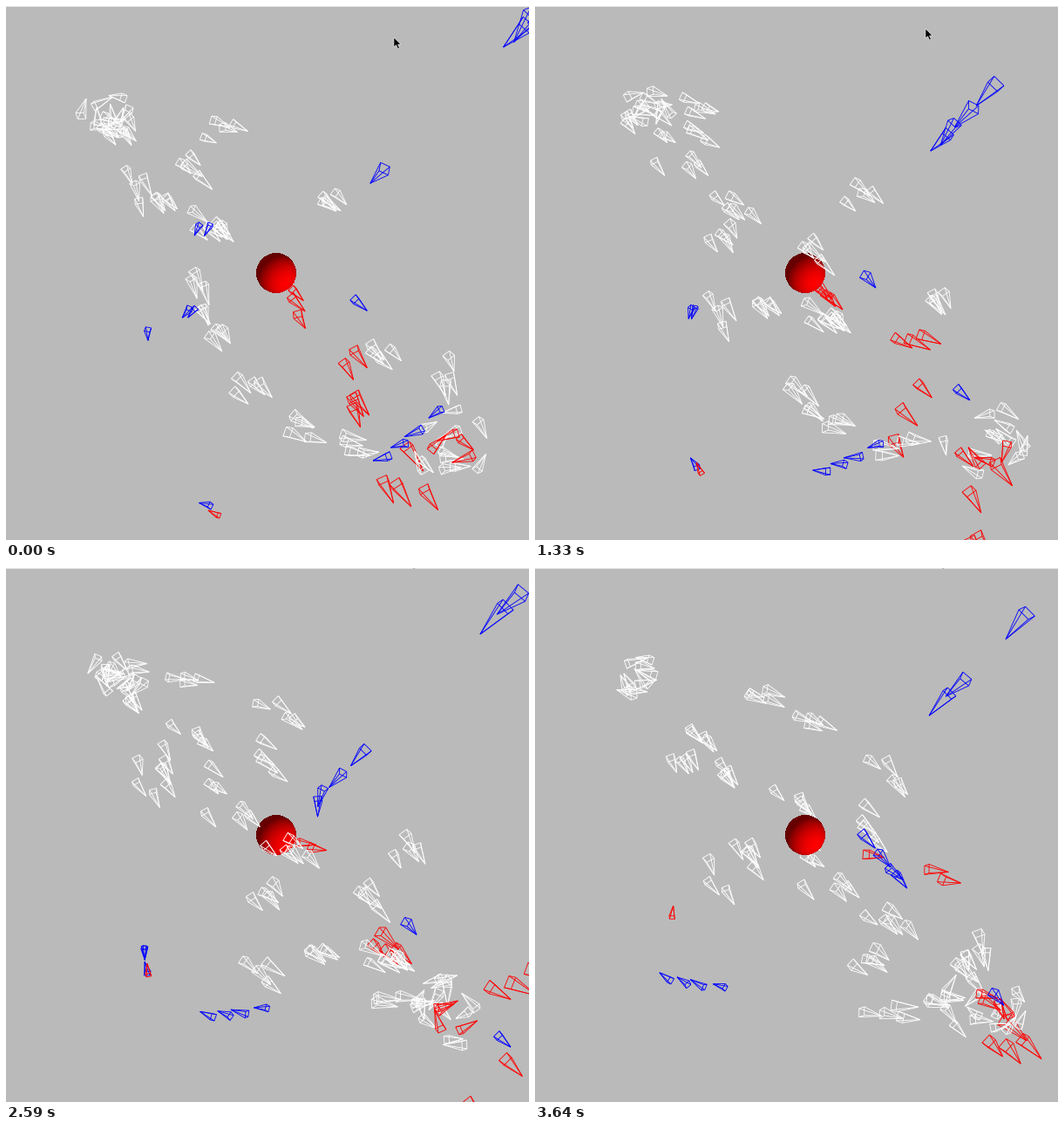
Animation, 600 px wide and 612 px high, one loop 3.71 s. Source, as a matplotlib script:

```python
import numpy as np
import matplotlib.pyplot as plt
from matplotlib.animation import FuncAnimation
from matplotlib.collections import LineCollection
from matplotlib.patches import Polygon

W, H, DPI = 600, 612, 100
FRAMES, STEP = 53, 70
PX = 72 / DPI
WHITE, BLUE, RED, GREY = "#ffffff", "#0000ff", "#ff0000", "#bababa"
BALL, BALL_R = np.array([309.5, 306.5]), 23
SOURCE, SINK = np.array([120, 120]), np.array([510, 490])

T = np.arange(FRAMES)
rng = np.random.default_rng(11)
boids = []


def add(x, y, color, size, live=True, front=True):
    """One boid on a path sampled per frame; it points along its motion."""
    pos = np.column_stack([x, y])
    vel = np.gradient(pos, axis=0)
    angle = np.unwrap(np.arctan2(vel[:, 1], vel[:, 0])) + rng.normal(0, 0.1)
    sizes = np.broadcast_to(size, T.shape) * rng.uniform(0.9, 1.1)
    live = np.broadcast_to(live, T.shape)
    boids.append((pos, angle, sizes, live, rng.uniform(0.45, 0.85),
                  rng.uniform(0.3, 1.2), color, front))


def stream(bow, launches, speed=7.6, team=4):
    """Teams that fly from the source to the sink, bowed to one side."""
    way = SINK - SOURCE
    length = np.hypot(*way)
    along = way / length
    across = np.array([along[1], -along[0]])
    late = 1 if bow > 0 else 1.6
    for launch in launches:
        front = rng.random() < 0.5
        for _ in range(team):
            s = speed * (T - launch - rng.normal(0, 1.8)) / length
            inside = np.clip(s, 0, 1)
            side = bow * np.sin(np.pi * inside ** late) ** 0.7 + rng.normal(0, 10)
            pos = SOURCE + np.outer(s, way) + np.outer(side, across)
            add(*pos.T, WHITE, 24 + 7 * inside, (s >= 0) & (s <= 1), front)


def burst(launch, heading, count):
    """Red boids that leave the ball and speed up."""
    for _ in range(count):
        age = T - launch - rng.normal(0, 1.5)
        a = np.radians(heading + rng.normal(0, 5))
        dist = 6.5 * age + 0.06 * age ** 2
        add(BALL[0] + dist * np.cos(a), BALL[1] + dist * np.sin(a), RED,
            24 + 0.04 * np.clip(dist, 0, 400), age >= 0, False)


def dive(entry, start=(590, 28), turn_at=325):
    """A blue boid that dives at the ball and swerves off below it."""
    t = np.arange(-60, FRAMES)
    run = 9.0 * (t - entry)
    turn = np.clip((run - turn_at) / 40, 0, 1)
    heading = np.radians(134.5 - 84 * turn)
    speed = 9 - 2 * turn
    x, y = np.cumsum(speed * np.cos(heading)), np.cumsum(speed * np.sin(heading))
    at = np.argmin(abs(run))
    rest = run[at]
    x = x - x[at] + start[0] + rest * np.cos(heading[at])
    y = y - y[at] + start[1] + rest * np.sin(heading[at])
    size = 50 - 22 * np.clip(run / turn_at, 0, 1)
    add(x[-FRAMES:], y[-FRAMES:], BLUE, size[-FRAMES:])


def swirl(center, reach, count, color=WHITE, size=27):
    """Boids that circle around a point."""
    for _ in range(count):
        r = reach * rng.uniform(0.25, 1)
        a = rng.uniform(0, 2 * np.pi) + rng.choice([-1, 1]) * rng.uniform(0.08, 0.16) * T
        add(center[0] + r * np.cos(a), center[1] + r * rng.uniform(0.5, 1) * np.sin(a),
            color, size)


stream(105, [-66, -33, -15, 14, 27, 35])
stream(48, [9])
stream(13, [-55, -15, -2, 21])
stream(-22, [-25, -23, 6, 12, 32, 38])
stream(-60, [-15, -4, 19])
stream(-120, [-62, -54, -45, -34, -27, -11, 22, 39])

swirl((124, 122), 42, 7)
swirl((125, 124), 10, 3)
swirl((516, 502), 55, 12)
swirl((516, 510), 50, 4, RED)

for shot in [(-33, 61, 4), (-24, 63, 3), (-19, 46, 2), (-6, 51, 3), (1, 41, 3),
             (11, 44, 3), (17, 48, 1), (28, 20, 2), (41, 22, 1)]:
    burst(*shot)

for entry in (-50, -26, -1, 0.5, 3.5, 7.5, 32, 35, 46):
    dive(entry)

# Shallow arc to the left along the bottom
for x0 in (430, 450, 467, 492):
    x = x0 - 5.4 * T
    add(x, 525 - 40 * ((x - 340) / 150) ** 2 - 0.4 * (x0 - 450), BLUE, 23 - T / 14)

# Blue boids that sink along the left side
for lag, drift in [(0, 60), (0, 72), (19, 150), (19, 170), (24, 20)]:
    age = T + lag
    left = np.clip(1 - age / 37, 0, 1)
    add(159 + drift * left ** 1.6, 257 + 5 * age, BLUE, 18, age <= 37)

# Pair that rises at the lower left
s = T / 46
for color, gap in ((BLUE, 0), (RED, 10)):
    trail = gap * (1 - s)
    add(158 + 70 * (1 - s) ** 2 + trail, 571 - 150 * s ** 1.3 + trail, color, 18,
        (s <= 1) | (color == RED))


def pyramid(pos, angle, size, pitch, roll):
    """Edges of a tilted four-sided pyramid with its tip along angle."""
    u = np.array([np.cos(angle), np.sin(angle)])
    side = np.array([-u[1], u[0]])
    reach = size * np.cos(pitch) / 2
    a = roll + np.arange(4) * np.pi / 2
    base = (pos - reach * u + 0.25 * size
            * (np.outer(np.cos(a), side) - np.sin(pitch) * np.outer(np.sin(a), u)))
    tip = pos + reach * u
    edges = [(base[k], base[(k + 1) % 4]) for k in range(4)]
    return edges + [(corner, tip) for corner in base]


fig = plt.figure(figsize=(W / DPI, H / DPI), dpi=DPI, facecolor=GREY)
ax = fig.add_axes([0, 0, 1, 1])
ax.axis("off")

# Ball lit from the lower right
n = 2 * BALL_R
v, u = np.mgrid[-1 + 1 / n:1:2 / n, -1 + 1 / n:1:2 / n]
depth = np.sqrt(np.clip(1 - u ** 2 - v ** 2, 0, 1))
ball = np.zeros(u.shape + (4,))
ball[..., 0] = np.clip(0.4 + 0.6 * np.clip(0.5 * u + 0.5 * v + 0.7 * depth, 0, 1), 0, 1)
ball[..., 3] = u ** 2 + v ** 2 <= 1
ax.imshow(ball, extent=(BALL[0] - BALL_R, BALL[0] + BALL_R, BALL[1] + BALL_R, BALL[1] - BALL_R),
          interpolation="nearest", zorder=2)
ax.set(xlim=(0, W), ylim=(H, 0), aspect="auto")
ax.axhspan(0, 1, color="#e8e8e8", lw=0, zorder=4)

layers = [LineCollection([], linewidths=0.85 * PX, zorder=z) for z in (1, 3)]
for layer in layers:
    ax.add_collection(layer, autolim=False)

ARROW = np.array([(0, 0), (0, 11), (2.6, 8.7), (4.6, 13), (6.4, 12.2), (4.5, 8), (8, 8)])
cursor = ax.add_patch(Polygon(ARROW, fc="black", ec="white", lw=0.5 * PX, zorder=5))


def draw(f):
    edges, colors = ([], []), ([], [])
    for pos, angle, size, live, pitch, roll, color, front in boids:
        if live[f]:
            edges[front].extend(pyramid(pos[f], angle[f], size[f], pitch, roll))
            colors[front].extend([color] * 8)
    for layer, e, c in zip(layers, edges, colors):
        layer.set_segments(e)
        layer.set_color(c)
    when = [16, 19, 27, 37]
    cursor.set_xy(ARROW + (np.interp(f, when, [445, 448, 460, 463]),
                           np.interp(f, when, [36, 26, 16, -12])))
    return [*layers, cursor]


anim = FuncAnimation(fig, draw, frames=FRAMES, interval=STEP, repeat=True, repeat_delay=0)
plt.show()
```
